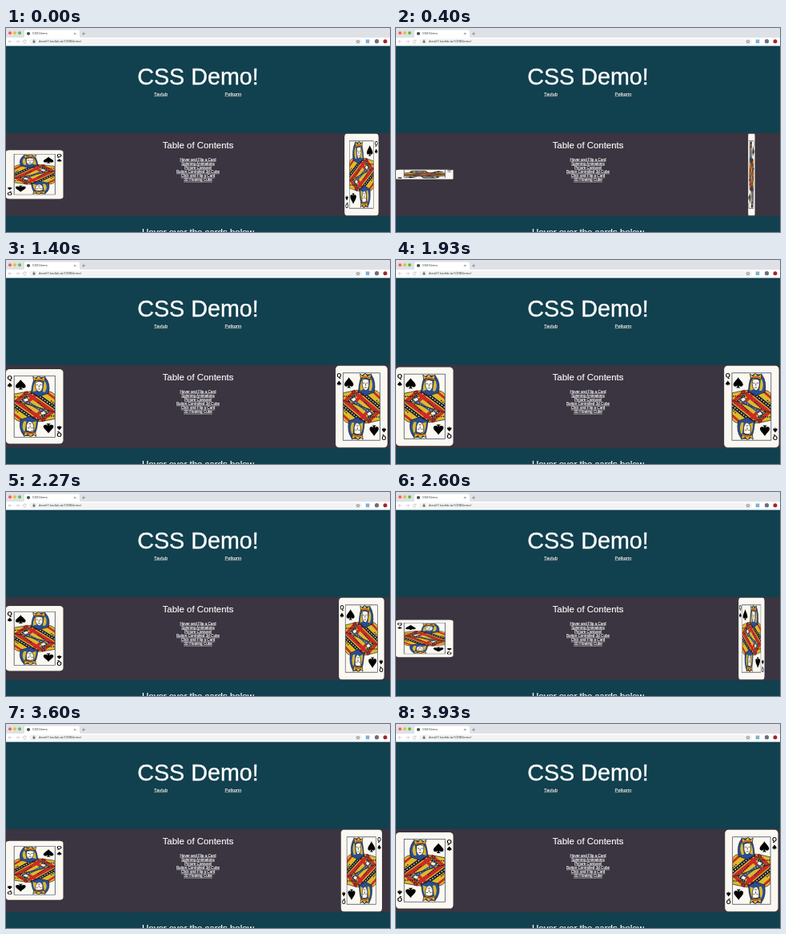
Recreate the animation shown at these times as an HTML page. Size 480 px wide and 256 px high, loop 3.99 s.

```html
<!DOCTYPE html>
<html lang="en">
<head>
<meta charset="utf-8">
<title>CSS Demo</title>
<style>
  html, body { margin: 0; width: 100%; height: 100%; overflow: hidden; background: #11404f; }
  svg { display: block; width: 480px; height: 256px; }
  text { font-family: "Liberation Sans", Arial, sans-serif; }
  .page { fill: #fff; text-anchor: middle; }
  .title { stroke: #fff; stroke-width: .35; }
  .head { stroke: #fff; stroke-width: .15; }
  .nav { font-size: 5.8px; stroke: #fff; stroke-width: .12; }
  .toc { font-size: 4.6px; stroke: #fff; stroke-width: .1; }
  .shade { fill: #04151b; stroke: #04151b; opacity: .75; }
  .ui { fill: #3c4043; font-family: Roboto, "Liberation Sans", sans-serif; }
  .icon { fill: none; stroke: #5f6368; stroke-width: .6; }
  .ink { stroke: #16151c; stroke-width: .7; }
  .band { fill: none; }
</style>
</head>
<body>
<svg viewBox="0 0 480 256">
  <defs>
    <path id="spade" d="M0-7C2-3.5 6.5-.5 6.5 2.6C6.5 5.6 2.5 6 .8 3.6Q1 6 2.8 7H-2.8Q-1 6-.8 3.6C-2.5 6-6.5 5.6-6.5 2.6C-6.5-.5-2-3.5 0-7Z"/>
    <clipPath id="upper"><path d="M-25-42H25V8L-25-8Z"/></clipPath>
    <g id="half">
      <g clip-path="url(#upper)">
        <!-- robe -->
        <path class="ink" d="M-25 2V-17Q-12-20-2-21H16Q22-20 25-16V10Z" fill="#dcbb2c"/>
        <path class="band" d="M-25-5L-8-20M-13-1L4-19" stroke="#c92c28" stroke-width="4"/>
        <path class="band" d="M-19-5L-2-20" stroke="#1d1d28" stroke-width="3"/>
        <path class="band" d="M-19-5L-2-20" stroke="#f6edcf" stroke-width="1.2" stroke-dasharray="1.6 1.8"/>
        <path class="band" d="M-7-16L25 9" stroke="#c92c28" stroke-width="5"/>
        <path class="band" d="M-2-20L27 3" stroke="#1d1d28" stroke-width="4.5"/>
        <path class="band" d="M-2-20L27 3" stroke="#f6edcf" stroke-width="1.3" stroke-dasharray="1.6 2"/>
        <path class="band" d="M14-20L27-9" stroke="#c92c28" stroke-width="3"/>
        <path class="band" d="M-14-9L8 6" stroke="#2a4d94" stroke-width="4"/>
        <path class="band" d="M-14-9L8 6" stroke="#e9cf58" stroke-width="1.2" stroke-dasharray="1.4 2"/>
        <path class="band" d="M-24-13L-10-13M4-6L14 4M20-8L25-3" stroke="#1d1d28" stroke-width="1.5" stroke-dasharray="1.5 1.3"/>
        <!-- head -->
        <path class="ink" d="M-4-19Q-3-36 2-40H13Q20-31 17-18L6-14Z" fill="#2a4d94"/>
        <path d="M-2-20Q-2-33 4-37L3-22ZM12-36Q17-28 13-20L10-20Z" fill="#dcbb2c"/>
        <path class="ink" d="M1-33Q5-36 10-33L10-26Q9-21 6-20Q2-21 1-27Z" fill="#fbf6eb"/>
        <path class="ink" d="M2-29.5h2M6.5-29.5h2M5.5-29V-26M4-23.8h3"/>
        <path class="ink" d="M-1-35L-2-41L2-38L5-42L8-38L13-41L12-34Q5-37-1-35Z" fill="#dcbb2c"/>
        <path class="band" d="M0-36Q5-38 11-36" stroke="#c92c28"/>
        <!-- hand and flower -->
        <path class="band" d="M-11-9V-17" stroke="#267044"/>
        <circle class="ink" cx="-11" cy="-18" r="2" fill="#c92c28"/>
        <path class="ink" d="M-14-10l5-2 2 4-5 2Z" fill="#fbf6eb"/>
      </g>
      <path class="ink" d="M-25-8L25 8"/>
      <use href="#spade" transform="translate(-17 -30) scale(.95)"/>
      <use href="#spade" transform="translate(-30.3 -29.5) scale(.42)"/>
      <text x="-30.3" y="-36.5" font-size="8" font-weight="bold" text-anchor="middle">Q</text>
    </g>
    <g id="card">
      <rect x="-35" y="-51" width="70" height="102" rx="4.5" fill="#faf8f0"/>
      <use href="#half"/>
      <use href="#half" transform="rotate(180)"/>
      <rect x="-25" y="-42" width="50" height="84" fill="none" stroke="#2b3560" stroke-width=".7"/>
    </g>
  </defs>

  <rect width="480" height="256" fill="#11404f"/>
  <rect y="131.7" width="480" height="104.6" fill="#3a3540"/>

  <!-- browser bar -->
  <rect width="480" height="13" fill="#dee1e6"/>
  <rect y="12" width="480" height="10.5" fill="#fff"/>
  <path d="M21 12.5Q23 12.5 23 10V4.5Q23 2.5 25 2.5H90Q92 2.5 92 4.5V10Q92 12.5 94 12.5Z" fill="#fff"/>
  <circle cx="5" cy="6.3" r="2" fill="#fc5b57"/>
  <circle cx="11" cy="6.3" r="2" fill="#e5bf3c"/>
  <circle cx="17" cy="6.3" r="2" fill="#57c038"/>
  <circle cx="28" cy="7" r="2.1" fill="#4a4d51"/>
  <text class="ui" x="33" y="8.4" font-size="4">CSS Demo</text>
  <path class="icon" d="M85 6l2.4 2.4M87.4 6L85 8.4M95.2 7.2h3.6M97 5.4V9"/>
  <rect x="29" y="13.5" width="416" height="7.4" rx="3.7" fill="#f1f3f4"/>
  <g opacity=".5">
    <path class="icon" d="M7.2 17H3.2M5 15.2L3.2 17L5 18.8"/>
    <path class="icon" d="M12.5 17H16.5M14.7 15.2L16.5 17L14.7 18.8"/>
    <path class="icon" d="M24.8 16A1.9 1.9 0 1 0 25 17.6M25 14.8V16.2H23.6"/>
  </g>
  <rect x="33.6" y="16.3" width="2.8" height="2.2" fill="#5f6368"/>
  <path class="icon" d="M34.2 16.3V15.6a.8.8 0 0 1 1.6 0V16.3"/>
  <text class="ui" x="40.7" y="18.4" font-size="4.4">dovel7.tavlub.io/CSSDemo/</text>
  <path class="icon" d="M440 14.9l.6 1.4 1.6.1-1.2 1 .4 1.5-1.4-.8-1.4.8.4-1.5-1.2-1 1.6-.1Z"/>
  <rect x="449.7" y="14.5" width="4.6" height="4.6" fill="#7fb2d2"/>
  <circle cx="463.5" cy="16.7" r="2.6" fill="#6b7078"/>
  <circle cx="474" cy="16.7" r="2.5" fill="#a3242e"/>

  <g class="page" id="page">
    <text class="title" x="240" y="71" font-size="28.7">CSS Demo!</text>
    <text class="head" x="240" y="151" font-size="11.4">Table of Contents</text>
    <text class="head" x="240" y="260.3" font-size="11.5">Hover over the cards below</text>
  </g>

  <use id="left" href="#card"/>
  <use id="right" href="#card"/>
</svg>
<script>
  const LOOP = 3990, FRAMES = 60;
  const topics = ["Hover and Flip a Card", "Spinning Animations", "Picture Carousel",
    "Button Controlled 3d Cube", "Click and Flip a Card", "3D Floating Cube"];
  // [time in ms, card angle in degrees]
  const turns = [[0, -128], [800, -66], [1400, -20], [1930, 7], [2600, 62], [3600, 138], [3930, 164]];

  const byId = id => document.getElementById(id);
  const left = byId("left"), right = byId("right");

  function add(tag, attrs, text = "") {
    const node = document.createElementNS("http://www.w3.org/2000/svg", tag);
    for (const name in attrs) node.setAttribute(name, attrs[name]);
    node.textContent = text;
    return byId("page").appendChild(node);
  }

  function addLink(label, x, y, style) {
    const width = add("text", { class: style, x, y }, label).getComputedTextLength();
    add("path", { class: style, d: `M${x - width / 2} ${y + .8}h${width}`, style: "stroke-width:.5" });
  }

  for (const [label, x] of [["Tavlub", 193.5], ["Pelkorin", 284]]) {
    addLink(label, x + .6, 85.8, "nav shade");
    addLink(label, x, 84.9, "nav");
  }
  topics.forEach((label, i) => addLink(label, 240, 166.5 + i * 5.17, "toc"));

  // 15 pictures a second, each starting on a multiple of 10 ms
  const startOf = k => Math.round(k * 20 / 3) * 10;

  function heldTime(t) {
    let k = FRAMES - 1;
    while (startOf(k) > t) k--;
    return startOf(k);
  }

  function angleAt(t) {
    let i = 1;
    while (i < turns.length - 1 && turns[i][0] < t) i++;
    const [t0, a0] = turns[i - 1], [t1, a1] = turns[i];
    return a0 + (a1 - a0) * (t - t0) / (t1 - t0);
  }

  function place(card, x, y, w, h) {
    card.setAttribute("transform", `translate(${x} ${y}) scale(${w / 70} ${h / 102})`);
  }

  function draw(now) {
    const turn = Math.cos(angleAt(heldTime(now % LOOP)) * Math.PI / 180);
    place(left, 35.7, 183.8, 71.6, 99.5 * turn);
    place(right, 444.4, 184, 69 * turn, 102.5);
  }

  let begin;
  function tick(now) {
    begin ??= now;
    draw(Math.max(0, now - begin));
    requestAnimationFrame(tick);
  }
  draw(0);
  requestAnimationFrame(tick);
</script>
</body>
</html>
```
